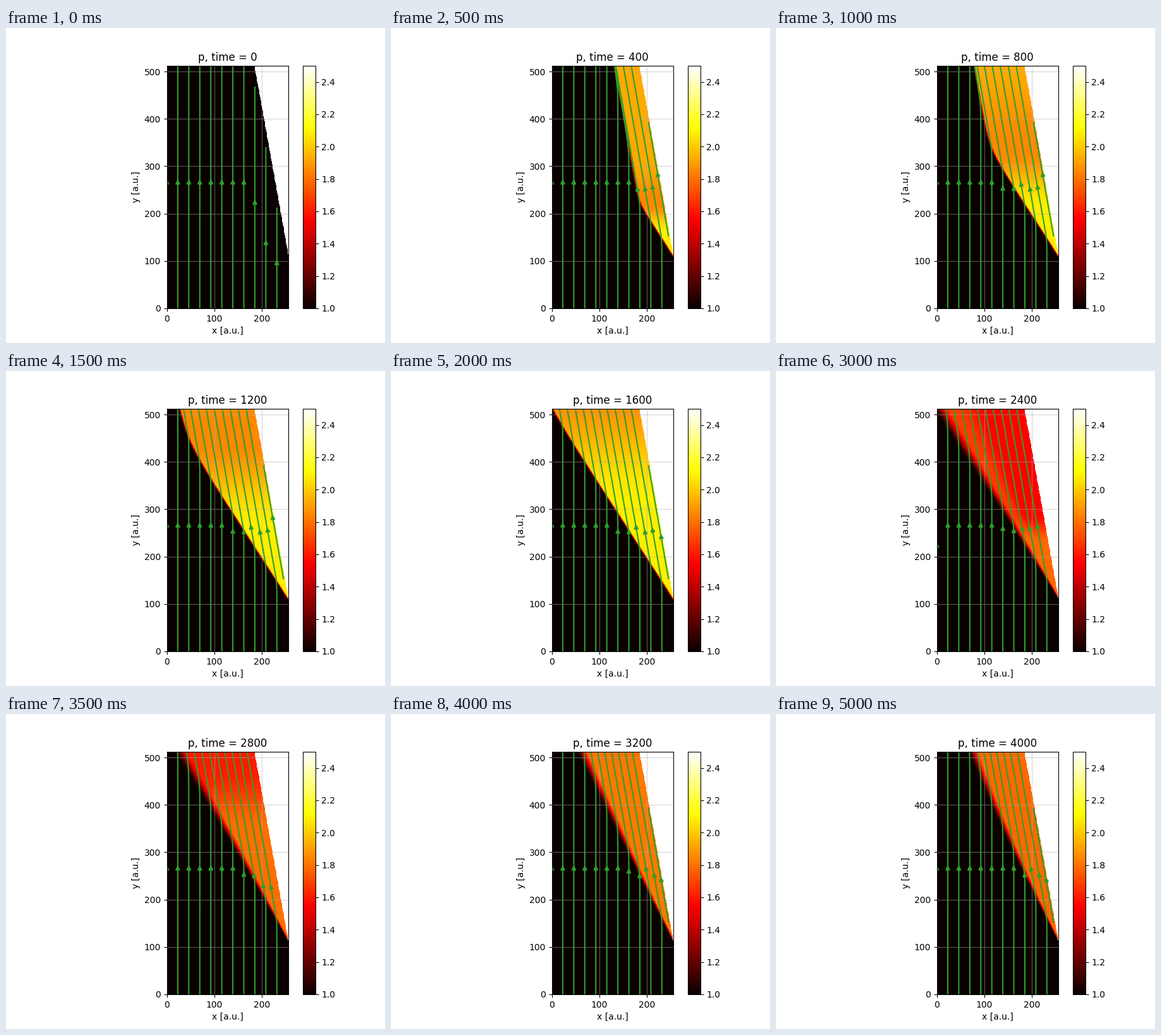
Write a matplotlib script that moves like this. It is 600 by 500 pixels and loops after 5250 ms.

```python
import numpy as np
import matplotlib.pyplot as plt
from matplotlib.animation import FuncAnimation

NX, NY = 256, 512
STEP, FRAMES, INTERVAL = 200, 21, 250
SWITCH = 2000              # time at which the inflow changes
TIP, WALL = 108.4, 0.1785  # height of the wedge tip, slope of its face
OBLIQUE = 0.643            # slope of the attached shock
TURN = 0.176               # slope of the flow behind the shock

xs, ys = np.arange(NX), np.arange(NY)
X, Y = np.meshgrid(xs.astype(float), ys.astype(float))
D = np.maximum(Y - TIP, 0)
wall_x = 255 - WALL * D
solid = (X > wall_x) & (Y > TIP)
no_flow = solid | (X >= 253)


def smooth(v):
    v = np.clip(v, 0, 1)
    return v * v * (3 - 2 * v)


def startup(t):
    """Piston-like front along the wedge joining the attached shock."""
    t = max(t, 1)
    s = 0.012 * t
    front = s * np.logaddexp((wall_x - 0.132 * t) / s,
                             (255 - OBLIQUE * D) / s)
    ramp = smooth((D / t - 0.13) / 0.15)
    lift = smooth((D / t - 0.3) / 0.2)
    behind = 2.08 - 0.23 * ramp + 0.08 * lift
    turn = TURN - 0.001 * ramp + 1e-6 * D
    return front - 3, 6, behind, turn


def relaxed(tau):
    """Old shock decaying into a weaker, steeper and wider one."""
    mix = smooth((tau - 100 - 0.65 * D) / 1150)
    new = 0.535 * D - 0.00015 * D**2
    front = 255 - 0.66 * D * (1 - mix) - new * mix
    spread = (tau / 400 * np.exp(1 - tau / 400))**2
    width = 4 + D * (0.05 + 0.03 * spread)

    steady = 1.78 + 0.04 * np.exp(-((tau - 1200) / 400)**2)
    ray = (wall_x - X) / np.maximum(D, 1) * 400 / tau
    fading = (1.55 + 0.08 * smooth((tau - 400) / 600)
              + 52 / tau * smooth((ray - 0.2) / 0.16))
    grown = 1 - smooth((D / tau - 0.3) / 0.16)
    return front, width, fading + (steady - fading) * grown, TURN


def fields(t):
    """Pressure and horizontal velocity (the vertical one is 1)."""
    state = startup(t) if t <= SWITCH else relaxed(t - SWITCH)
    front, width, behind, turn = state
    shocked = smooth((X - front) / width) * (Y > TIP) * (t > 0)
    p = 1 + (behind - 1) * shocked
    # the slight drift keeps the arrows' halfway points unambiguous
    u = 1e-4 * Y / NY * (1 - shocked) - turn * shocked
    return np.ma.array(p, mask=solid), np.ma.array(u, mask=no_flow)


fig, ax = plt.subplots(figsize=(6, 5), dpi=100)
image = ax.imshow(fields(0)[0], cmap="hot", vmin=1, vmax=2.5, origin="lower",
                  extent=(0, NX, 0, NY), interpolation="nearest")
fig.colorbar(image)
ax.set(xlim=(0, NX), ylim=(0, NY), xlabel="x [a.u.]", ylabel="y [a.u.]")
ax.grid(alpha=0.5)
title = ax.set_title("")
upward = np.ma.array(np.ones((NY, NX)), mask=no_flow)


def draw(i):
    t = i * STEP
    p, u = fields(t)
    image.set_data(p)
    title.set_text(f"p, time = {t}")
    for old in [*ax.collections, *ax.patches]:
        old.remove()
    ax.streamplot(xs, ys, u, upward, density=0.4, color="C2",
                  broken_streamlines=False)


anim = FuncAnimation(fig, draw, frames=FRAMES, interval=INTERVAL,
                     init_func=lambda: None, repeat=True, repeat_delay=0)
plt.show()
```
